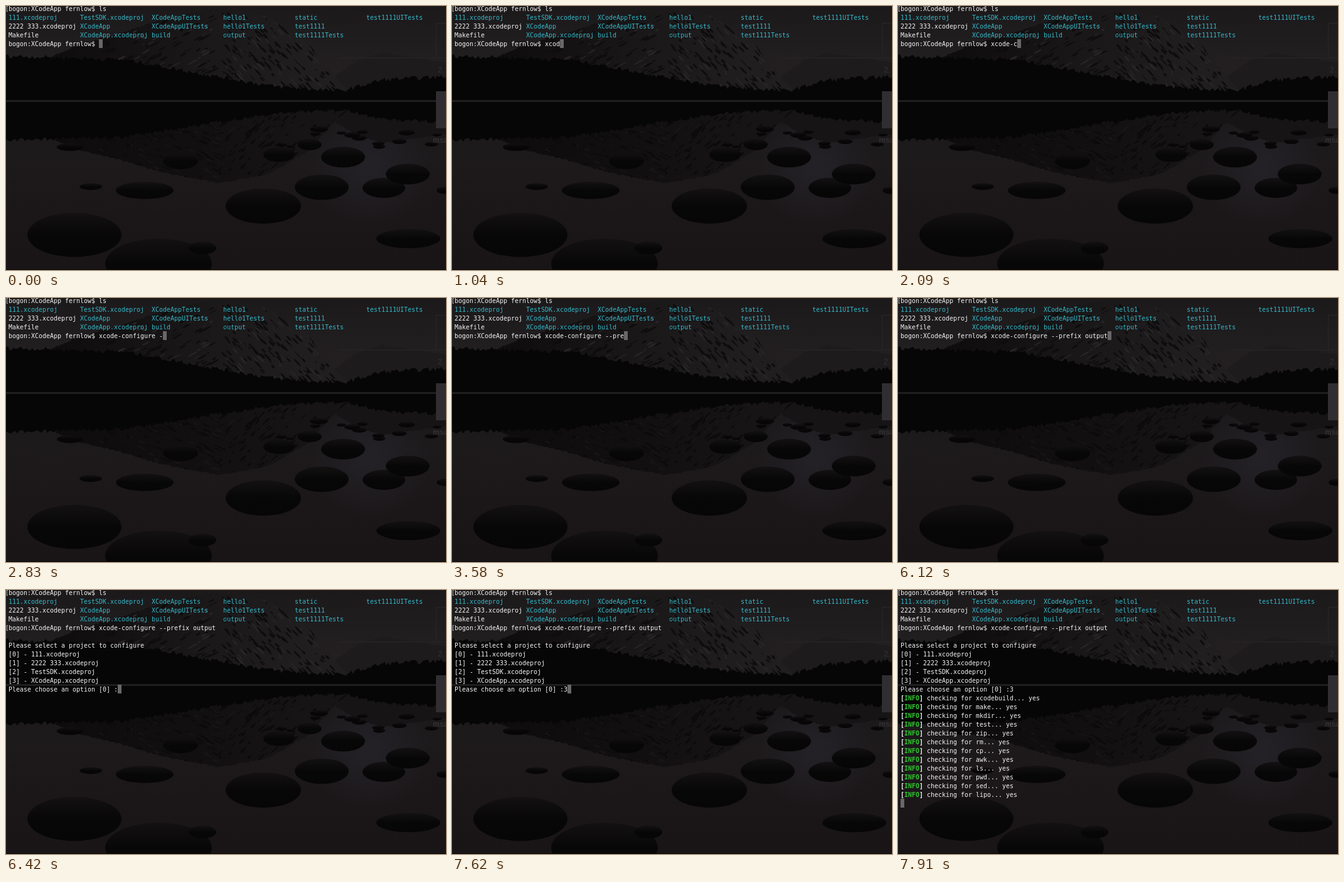
These frames come from a looping animation (701 by 421 pixels, 8 s). An HTML page with a canvas:

```html
<!DOCTYPE html>
<html lang="en">
<head>
<meta charset="utf-8">
<title>Terminal session</title>
<style>
html, body { margin: 0; width: 100%; height: 100%; overflow: hidden; background: #1a1719; }
canvas { position: absolute; left: 0; top: 0; }
</style>
</head>
<body>
<canvas id="scene" width="701" height="421"></canvas>
<canvas id="term" width="701" height="421"></canvas>
<script>
const context = id => document.getElementById(id).getContext('2d');
const bg = context('scene'), g = context('term');
const W = 701, H = 421, SHORE = 151, LOOP = 8000;

let seed = 7;
const rnd = (a, b) => {
  seed = (seed * 16807) % 2147483647;
  return a + (b - a) * seed / 2147483647;
};

// ---- dim lake wallpaper ----
const PEAK = [[60, 88], [120, 62], [180, 46], [250, 22], [340, 3], [415, 18], [480, 60], [530, 122], [562, SHORE]];
const HILLS = [[515, 120], [560, 88], [600, 76], [640, 82], [W, 91]];
const TREES = [[0, 83], [190, 89], [320, 113], [430, 132], [535, 139], [600, 121], [W, 116]];

function blend(grad, colors) {
  colors.forEach((c, i) => grad.addColorStop(i / (colors.length - 1), c));
  return grad;
}
const across = (x0, x1, ...colors) => blend(bg.createLinearGradient(x0, 0, x1, 0), colors);
const down = (y0, y1, ...colors) => blend(bg.createLinearGradient(0, y0, 0, y1), colors);

function box(x, y, w, h, color) {
  bg.fillStyle = color;
  bg.fillRect(x, y, w, h);
}

// straight line between key points, roughened, closed along the shore
function ridge(points, color, rough) {
  bg.fillStyle = color;
  bg.beginPath();
  bg.moveTo(points[0][0], SHORE);
  points.forEach(([x, y], i) => {
    const [nx, ny] = points[i + 1] || [x + 1, y];
    for (let px = x; px < nx; px += 3)
      bg.lineTo(px, y + (ny - y) * (px - x) / (nx - x) - rnd(0, rough));
  });
  bg.lineTo(points.at(-1)[0], SHORE);
  bg.fill();
}

// mottling that leans down the slope, denser towards the foot
function crags(color, n) {
  bg.fillStyle = color;
  for (let i = 0; i < n; i++) {
    const x = rnd(150, 550), y = SHORE - 140 * rnd(0, 1) ** 1.5, w = rnd(2, 9);
    bg.beginPath();
    bg.ellipse(x, y, w, rnd(0.6, 2), x < 340 ? -0.5 : 0.8, 0, 7);
    bg.fill();
  }
}

function land(rockShades, hill, dark, light) {
  ridge(HILLS, hill, 2);
  bg.save();
  ridge(PEAK, across(100, 480, ...rockShades), 3);
  bg.clip();
  crags(dark, 420);
  crags(light, 130);
  bg.restore();
  ridge(TREES, '#070607', 7);
}

function stone(x, y, r, flatness) {
  const ry = r * flatness;
  bg.fillStyle = down(y - ry, y + ry, '#131112', '#080707', '#070606');
  bg.beginPath();
  bg.ellipse(x, y, r, ry, 0, 0, 7);
  bg.fill();
}

function drawScene() {
  box(0, 0, W, SHORE, down(0, SHORE, '#1c191b', '#211e20', '#252123'));
  box(0, SHORE, W, H - SHORE, down(SHORE, H, '#1b181a', '#1d1a1c', '#1b1719', '#191517'));
  box(400, 160, W - 400, 200,
    blend(bg.createRadialGradient(580, 255, 10, 580, 255, 95), ['#232126', '#23212600']));
  land(['#0f0d0e', '#191718', '#211e20'], '#1e1b1d', '#0e0d0e', '#272426');

  bg.save();
  bg.translate(0, SHORE * 1.88);
  bg.scale(1, -0.88);
  land(['#0e0c0d', '#110f10', '#161415'], '#161415', '#0c0b0c', '#171516');
  bg.restore();
  box(0, SHORE - 1, W, 3, '#201d1f');

  for (let i = 0; i < 14; i++) stone(rnd(370, 690), rnd(194, 228), rnd(6, 16), 0.35);
  [[221, 294, 46], [135, 288, 18], [102, 225, 21], [641, 371, 51]]
    .forEach(s => stone(...s, 0.3));
  [[278, 247, 28], [435, 237, 25], [484, 221, 19], [537, 241, 35], [503, 289, 43], [602, 290, 34],
   [640, 268, 35], [698, 294, 12], [410, 319, 60], [109, 365, 75], [243, 411, 85], [313, 386, 22]]
    .forEach(s => stone(...s, 0.47));

  // hints of the desktop behind the window
  box(685, 136, 16, 59, '#312e31');
  bg.strokeStyle = '#2a272a';
  bg.strokeRect(685.5, 27.5, 24, 56);
  box(530, 82, 171, 2, '#252224');
  bg.fillStyle = '#343134';
  bg.font = '12px "Liberation Sans", sans-serif';
  bg.fillText('2.', 688, 106);
  bg.font = 'bold 12px "Liberation Sans", sans-serif';
  bg.fillText('msa', 680, 218);
  box(0, H - 1, W, 1, '#080708');
}

// ---- terminal ----
const WHITE = '#f2f2f2', CYAN = '#35b8c8', GREEN = '#2ec72e';
const PROMPT = 'bogon:XCodeApp fernlow$ ';
const LISTING = [
  ['111.xcodeproj', 'TestSDK.xcodeproj', 'XCodeAppTests', 'hello1', 'static', 'test1111UITests'],
  ['2222 333.xcodeproj', 'XCodeApp', 'XCodeAppUITests', 'hello1Tests', 'test1111'],
  ['Makefile', 'XCodeApp.xcodeproj', 'build', 'output', 'test1111Tests']
];
const MENU = ['Please select a project to configure', '[0] - 111.xcodeproj',
  '[1] - 2222 333.xcodeproj', '[2] - TestSDK.xcodeproj', '[3] - XCodeApp.xcodeproj'];
const QUESTION = 'Please choose an option [0] :';
const TOOLS = 'xcodebuild make mkdir test zip rm cp awk ls pwd sed lipo'.split(' ');

// bursts of typing: start time, then pieces that appear one per KEY_STEP
const KEY_STEP = 150;
const BURSTS = [[450, 'x'], [900, 'co'], [1040, 'd'], [1340, 'e'], [1640, '-'],
  [2090, 'c', 'o', 'nfigure '], [2830, '-', '-'], [3280, ...'prefix'],
  [5220, ...' out'], [5970, 'pu', 't']];
const MENU_AT = 6420, ANSWER_AT = 7620, CHECKS_AT = 7910;

const typed = t => BURSTS.map(([start, ...pieces]) =>
  pieces.filter((_, i) => t >= start + i * KEY_STEP).join('')).join('');

function put(col, row, text, color = WHITE, weight = '') {
  g.font = weight + ' 10px "DejaVu Sans Mono", monospace';
  g.fillStyle = color;
  [...text].forEach((c, i) => g.fillText(c, 4 + 6 * (col + i), 8 + 14 * row));
}

function cursor(col, row) {
  g.fillStyle = '#696769';
  g.fillRect(4 + 6 * col, 14 * row - 3, 6, 14);
}

// thin bracket left of a finished prompt
function mark(row) {
  g.strokeStyle = '#a5a3a5';
  g.strokeRect(1.5, 14 * row + 0.5, 1, 8);
  g.clearRect(2, 14 * row + 1, 2, 7);
}

function draw(t) {
  g.clearRect(0, 0, W, H);
  mark(0);
  put(0, 0, PROMPT + 'ls');
  LISTING.forEach((names, r) => names.forEach((name, c) =>
    put(19 * c, r + 1, name, r && !c ? WHITE : CYAN)));

  const line = PROMPT + typed(t);
  put(0, 4, line);
  if (t < MENU_AT) return cursor(line.length, 4);

  mark(4);
  MENU.forEach((s, i) => put(0, 6 + i, s));
  const answer = QUESTION + (t < ANSWER_AT ? '' : '3');
  put(0, 11, answer);
  if (t < CHECKS_AT) return cursor(answer.length, 11);

  TOOLS.forEach((tool, i) => {
    put(0, 12 + i, '[    ]', WHITE, 'bold');
    put(1, 12 + i, 'INFO', GREEN, 'bold');
    put(7, 12 + i, `checking for ${tool}... yes`);
  });
  cursor(0, 12 + TOOLS.length);
}

function tick() {
  draw(performance.now() % LOOP);
  requestAnimationFrame(tick);
}

drawScene();
tick();
</script>
</body>
</html>
```
